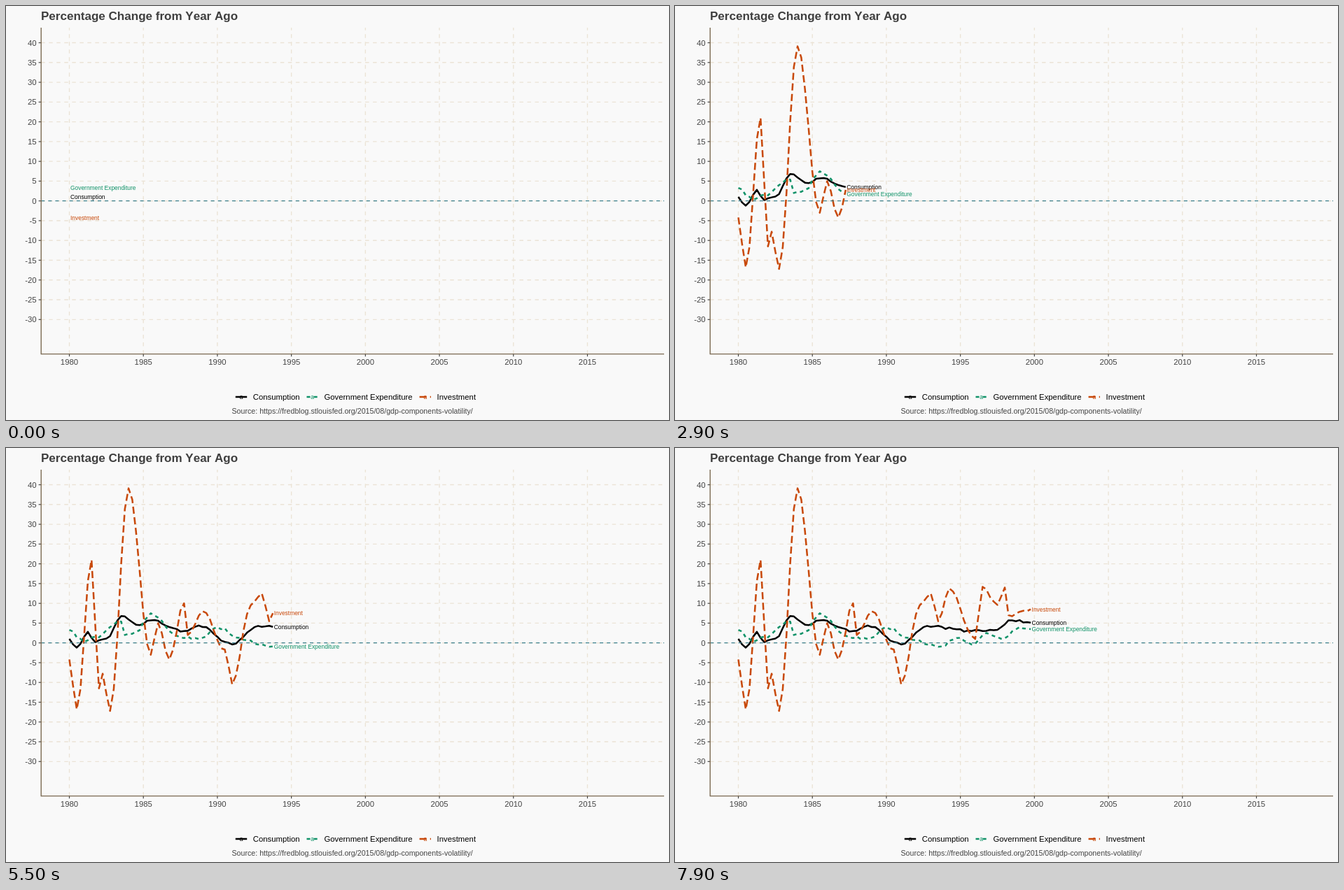
An HTML page for the animation above (8 s loop, 947 by 592 pixels).

```html
<!DOCTYPE html>
<html lang="en">
<head>
<meta charset="utf-8">
<title>Percentage Change from Year Ago</title>
<style>
html, body { margin: 0; width: 100%; height: 100%; overflow: hidden; background: #f9f9f9; }
svg { display: block; font-family: "Liberation Sans", Arial, sans-serif; font-kerning: none; }
.title { font-size: 17.04px; font-weight: bold; fill: #3f3f3f; }
.tick { font-size: 11.36px; fill: #444; }
.key { font-size: 11.36px; }
.note { font-size: 10.65px; fill: #444; }
.label { font-size: 8.42px; }
.grid { stroke: #ebe3d6; stroke-width: 1.38; stroke-dasharray: 5.51; }
.zero { stroke: #3b7f8c; stroke-width: 1.3; stroke-dasharray: 5.05; }
.axis { stroke: #7a6850; stroke-width: 1.38; }
.mark { stroke: #444; stroke-width: 1.2; }
.series { fill: none; stroke-width: 2.53; stroke-linejoin: round; }
</style>
</head>
<body>
<svg id="chart" width="947" height="592" viewBox="0 0 947 592"></svg>
<script>
const LOOP = 8000, STEP = 100, QUARTERS = LOOP / STEP;
const PANEL = { left: 50.2, right: 940, top: 31, bottom: 497.6 };
const svg = document.getElementById('chart');

const xAt = year => 90.5 + (year - 1980) * 21.143;
const yAt = value => 278.7 - value * 5.654;

// Turning points are [quarter since 1980, value]; wobble is the size of the noise between them
const series = [
  { name: 'Consumption', color: '#000', dash: 'none', keyX: 327.8, wobble: .6, turns: [
    [0, 1], [2, -1.2], [5, 2.8], [7, .2], [10, 1.1], [14, 6.8], [19, 4.5], [22, 5.7],
    [31, 3], [35, 4.4], [44, -.4], [51, 4.3], [63, 3], [69, 3.2], [74, 5.7], [79, 5.1]] },
  { name: 'Government Expenditure', color: '#109268', dash: '5.05', keyX: 429.5, wobble: .8, turns: [
    [0, 3.3], [4, .2], [7, 1.6], [14, 5.4], [15, 2], [18, 2.8], [22, 7.5], [30, 1.4], [35, 1],
    [40, 4], [47, .8], [54, -1], [60, 1.3], [63, -.4], [67, 2.5], [72, 1.2], [76, 4], [79, 3.5]] },
  { name: 'Investment', color: '#c8490a', dash: '10.1 5.05', keyX: 590.6, wobble: .8, turns: [
    [0, -4.2], [2, -16.8], [6, 21], [8, -11.5], [9, -7.8], [11, -17.2], [16, 39.1], [22, -3],
    [24, 5], [27, -4.2], [31, 10], [32, 2], [36, 8], [42, -1.7], [44, -10.5], [49, 9.5],
    [52, 12.5], [54, 5.5], [57, 13.8], [64, 1], [66, 14.2], [70, 9.6], [72, 14], [73, 7], [79, 8.5]] }
];

function makeRandom(seed) {
  return () => (seed = seed * 16807 % 2147483647) / 2147483647;
}
const random = makeRandom(1980);

// Eases from one turning point to the next, with noise only in between
function valueAt({ turns, wobble }, quarter) {
  const next = turns.findIndex(([q]) => q >= quarter);
  const [q1, v1] = turns[next];
  if (q1 === quarter) return v1;
  const [q0, v0] = turns[next - 1];
  const ease = (1 - Math.cos(Math.PI * (quarter - q0) / (q1 - q0))) / 2;
  return v0 + (v1 - v0) * ease + (random() - .5) * wobble;
}

function add(tag, attrs, content = '') {
  const el = document.createElementNS('http://www.w3.org/2000/svg', tag);
  for (const k in attrs) el.setAttribute(k, attrs[k]);
  el.textContent = content;
  return svg.appendChild(el);
}
const line = (cls, x1, y1, x2, y2, more) => add('line', { class: cls, x1, y1, x2, y2, ...more });
const text = (cls, x, y, content, more) => add('text', { class: cls, x, y, ...more }, content);

text('title', 50, 19.6, 'Percentage Change from Year Ago');

for (let v = -30; v <= 40; v += 5) {
  const y = yAt(v);
  line('grid', PANEL.left, y, PANEL.right, y);
  line('mark', 46.6, y, PANEL.left, y);
  text('tick', 43.7, y + 4, v, { 'text-anchor': 'end' });
}
for (let year = 1980; year <= 2015; year += 5) {
  const x = xAt(year);
  line('grid', x, PANEL.bottom, x, PANEL.top);
  line('mark', x, PANEL.bottom, x, 501.2);
  text('tick', x, 512.8, year, { 'text-anchor': 'middle' });
}

for (const s of series) {
  const stroke = { stroke: s.color, 'stroke-dasharray': s.dash };
  s.points = Array.from({ length: QUARTERS }, (_, q) => [xAt(1980 + q / 4), yAt(valueAt(s, q))]);
  s.path = add('polyline', { class: 'series', ...stroke });
  line('series', s.keyX, 559, s.keyX + 16.4, 559, stroke);
  text('label', s.keyX + 8.2, 562, 'a', { fill: s.color, 'text-anchor': 'middle' });
  text('key', s.keyX + 24.9, 563, s.name);
}
line('zero', PANEL.left, yAt(0), PANEL.right, yAt(0));
for (const s of series) s.label = text('label', 0, 0, s.name, { fill: s.color });

line('axis', PANEL.left, PANEL.top, PANEL.left, PANEL.bottom + .7);
line('axis', PANEL.left, PANEL.bottom, PANEL.right, PANEL.bottom);
text('note', 322.5, 583, 'Source: https://fredblog.stlouisfed.org/2015/08/gdp-components-volatility/');

let shown = -1;
function draw(quarter) {
  if (quarter === shown) return;
  shown = quarter;
  for (const s of series) {
    const [x, y] = s.points[quarter];
    s.path.setAttribute('points', quarter ? s.points.slice(0, quarter + 1).join(' ') : '');
    s.label.setAttribute('x', x + 1.5);
    s.label.setAttribute('y', y + 3.1);
  }
}

const start = performance.now();
function tick() {
  draw(Math.floor((performance.now() - start) % LOOP / STEP));
  requestAnimationFrame(tick);
}
tick();
</script>
</body>
</html>
```
